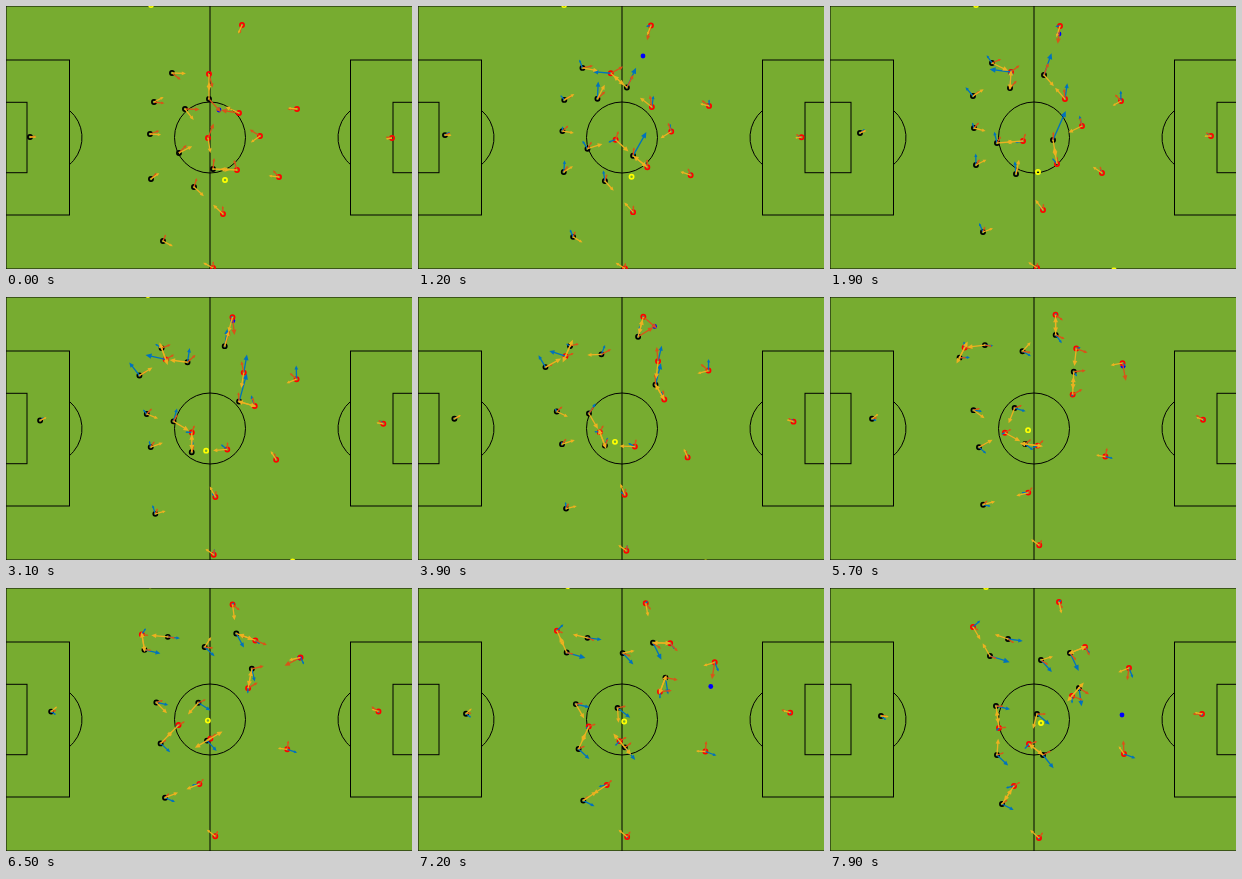
These frames come from a looping animation (406 px wide and 263 px high, 8000 ms). An HTML page with a canvas:

```html
<!DOCTYPE html>
<html lang="en">
<head>
<meta charset="utf-8">
<title>Match tracking</title>
<style>
html, body { margin: 0; width: 100%; height: 100%; overflow: hidden; background: #77ac30; }
canvas { display: block; }
</style>
</head>
<body>
<canvas id="pitch" width="406" height="263"></canvas>
<script>
const ctx = document.getElementById('pitch').getContext('2d');
const W = 406, H = 263, LOOP = 8000, STEP = 100;
const MID_X = 204, MID_Y = 131.5, RADIUS = 35.5;
const LOOKAHEAD = 1.2; // seconds of travel shown by a velocity arrow
const KEYS = [0, 1.9, 4.8, 7.9]; // seconds
const LAST = KEYS.length - 1;
const BLUE = '#0072bd', ORANGE = '#d95319', GOLD = '#edb120';

const span = i => KEYS[i + 1] - KEYS[i];

// Slopes of a cubic spline that starts at rest and ends without bending.
function slopes(v) {
  const rate = i => (v[i + 1] - v[i]) / span(i);
  const m = v.map(() => 0);
  for (let pass = 0; pass < 20; pass++) {
    for (let i = 1; i < LAST; i++) {
      const a = span(i - 1), b = span(i);
      m[i] = (3 * (b * rate(i - 1) + a * rate(i)) - b * m[i - 1] - a * m[i + 1]) / (2 * (a + b));
    }
    m[LAST] = 1.5 * rate(LAST - 1) - 0.5 * m[LAST - 1];
  }
  return m;
}

// Value and speed along one axis.
function curve(v) {
  const m = slopes(v);
  return t => {
    let i = 0;
    while (i < LAST - 1 && t >= KEYS[i + 1]) i++;
    const h = span(i), u = (t - KEYS[i]) / h;
    const p = m[i] * h, q = m[i + 1] * h, d = v[i + 1] - v[i];
    const c2 = 3 * d - 2 * p - q, c3 = p + q - 2 * d;
    return [v[i] + u * (p + u * (c2 + u * c3)), (p + u * (2 * c2 + 3 * u * c3)) / h];
  };
}

// One x, y pair per key time.
function track(...xy) {
  const fx = curve(xy.filter((_, i) => i % 2 === 0));
  const fy = curve(xy.filter((_, i) => i % 2 === 1));
  return t => {
    const [x, vx] = fx(t), [y, vy] = fy(t);
    return { x, y, vx, vy };
  };
}

const black = [
  track(24, 131, 30, 127, 39, 121, 51, 128),
  track(148, 96, 143, 90, 125, 63, 160, 68),
  track(166, 67, 162, 57, 151, 48, 178, 51),
  track(179, 103, 180, 82, 187, 53, 211, 72),
  track(203, 93, 214, 69, 222, 35, 240, 65),
  track(207, 163, 223, 134, 241, 76, 249, 100),
  track(144, 128, 144, 122, 139, 113, 166, 118),
  track(173, 147, 167, 137, 177, 111, 207, 126),
  track(188, 181, 186, 168, 190, 145, 213, 167),
  track(145, 173, 146, 159, 145, 147, 167, 167),
  track(157, 235, 153, 226, 149, 208, 172, 216)
];

const red = [
  track(236, 19, 230, 20, 225, 19, 229, 14),
  track(203, 68, 181, 66, 138, 55, 143, 39),
  track(233, 107, 235, 93, 243, 55, 255, 59),
  track(291, 103, 291, 95, 291, 67, 299, 80),
  track(254, 130, 252, 120, 244, 98, 242, 108),
  track(202, 132, 193, 135, 178, 135, 169, 140),
  track(231, 164, 227, 158, 212, 148, 199, 156),
  track(273, 171, 272, 167, 271, 159, 294, 166),
  track(217, 208, 213, 204, 203, 196, 184, 198),
  track(207, 262, 207, 262, 209, 250, 209, 250),
  track(386, 132, 381, 130, 374, 123, 372, 126)
];

const officials = [
  track(219, 174, 208, 166, 196, 137, 211, 135),
  track(145, -1, 146, -1, 137, -3.5, 156, -1),
  track(280, 268, 284, 264.5, 288, 267, 284, 269)
];

// Time, x, y: straight passes between touches.
const touches = [
  [0, 213, 104], [1.2, 225, 50], [1.9, 229, 28], [3.6, 226, 22],
  [5.5, 293, 69], [6.5, 293.5, 70], [7.9, 292, 127]
];

function ballAt(t) {
  let i = 0;
  while (i < touches.length - 2 && t >= touches[i + 1][0]) i++;
  const [ta, xa, ya] = touches[i], [tb, xb, yb] = touches[i + 1];
  const u = (t - ta) / (tb - ta);
  return { x: xa + u * (xb - xa), y: ya + u * (yb - ya) };
}

function arc(x, y, r, from = 0, to = 2 * Math.PI) {
  ctx.beginPath();
  ctx.arc(x, y, r, from, to);
}

// A box on the goal line, centred on the goal.
function box(depth, half) {
  ctx.strokeRect(-2, MID_Y - half, depth + 2, 2 * half);
}

function drawPitch() {
  ctx.fillStyle = '#77ac30';
  ctx.fillRect(0, 0, W, H);
  ctx.strokeStyle = '#000';
  ctx.lineWidth = 1;
  ctx.strokeRect(0, 0, 2 * MID_X, H);
  ctx.beginPath();
  ctx.moveTo(MID_X, 0);
  ctx.lineTo(MID_X, H);
  ctx.stroke();
  arc(MID_X, MID_Y, RADIUS);
  ctx.stroke();
  const bend = Math.acos(23 / RADIUS);
  for (const side of [1, -1]) {
    ctx.save();
    if (side < 0) ctx.translate(2 * MID_X, 0);
    ctx.scale(side, 1);
    box(63.5, 77.5);
    box(21, 35.2);
    arc(40.5, MID_Y, RADIUS, -bend, bend);
    ctx.stroke();
    ctx.restore();
  }
}

function ring(p, color) {
  ctx.strokeStyle = color;
  ctx.lineWidth = 1.7;
  arc(p.x, p.y, 2.1);
  ctx.stroke();
}

function arrow(p, dx, dy, color) {
  const len = Math.hypot(dx, dy);
  if (len < 1) return;
  const head = Math.min(6, Math.max(2, len * 0.3));
  ctx.save();
  ctx.translate(p.x, p.y);
  ctx.rotate(Math.atan2(dy, dx));
  ctx.strokeStyle = ctx.fillStyle = color;
  ctx.lineWidth = 1.3;
  ctx.beginPath();
  ctx.moveTo(0, 0);
  ctx.lineTo(len - head / 2, 0);
  ctx.stroke();
  ctx.beginPath();
  ctx.moveTo(len, 0);
  ctx.lineTo(len - head, head * 0.45);
  ctx.lineTo(len - head, -head * 0.45);
  ctx.fill();
  ctx.restore();
}

const gap = (a, b) => Math.hypot(b.x - a.x, b.y - a.y);

// Attraction fades with distance.
function pull(p, goal, color) {
  const d = gap(p, goal);
  if (d < 0.01) return;
  const k = Math.min(18, 85 / Math.sqrt(d)) / d;
  arrow(p, (goal.x - p.x) * k, (goal.y - p.y) * k, color);
}

const nearest = (p, list) => list.reduce((a, b) => gap(p, b) < gap(p, a) ? b : a);

function draw(t) {
  const at = f => f(t);
  const home = black.map(at), away = red.map(at), all = home.concat(away);
  const ball = ballAt(t);
  drawPitch();
  ctx.fillStyle = '#00f';
  arc(ball.x, ball.y, 2.4);
  ctx.fill();
  home.forEach(p => ring(p, '#000'));
  away.forEach(p => ring(p, '#f00'));
  officials.map(at).forEach(p => ring(p, '#ff0'));
  all.forEach(p => arrow(p, p.vx * LOOKAHEAD, p.vy * LOOKAHEAD, BLUE));
  all.forEach(p => pull(p, ball, ORANGE));
  home.forEach(p => pull(p, nearest(p, away), GOLD));
  away.forEach(p => pull(p, nearest(p, home), GOLD));
}

function tick() {
  const t = performance.now() % LOOP;
  draw(Math.floor(t / STEP) * STEP / 1000);
  requestAnimationFrame(tick);
}
tick();
</script>
</body>
</html>
```
